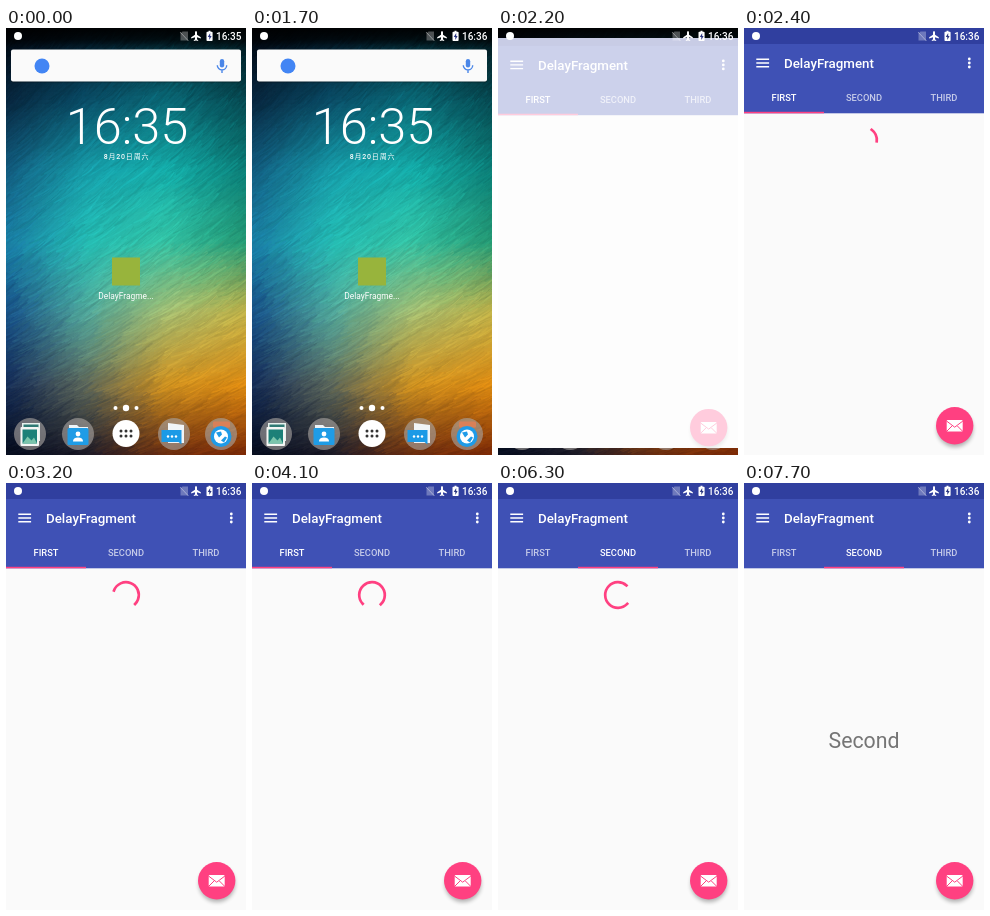
An HTML page with a canvas that plays this animation: 240x427 px, repeating every 8000 ms.

```html
<!DOCTYPE html>
<html lang="en">
<head>
<meta charset="utf-8">
<title>Delayed tab loading</title>
<style>
  html, body { margin: 0; width: 100%; height: 100%; overflow: hidden; background: #000; }
  canvas, svg { position: absolute; left: 0; top: 0; width: 100%; height: 100%; display: block; }
  text { font-family: Roboto, "Noto Sans", sans-serif; fill: #fff; text-anchor: middle; }
  .cjk { font-family: Roboto, "Noto Sans CJK SC", "Noto Sans CJK", sans-serif; }
  .tab { font-size: 9.33px; font-weight: 500; }
</style>
</head>
<body>
<canvas id="wall" width="240" height="427"></canvas>
<svg viewBox="0 0 240 427" preserveAspectRatio="none">
  <defs>
    <linearGradient id="scrim" x2="0" y2="1">
      <stop offset="0" stop-opacity=".9"/><stop offset=".6" stop-opacity=".6"/><stop offset="1" stop-opacity="0"/>
    </linearGradient>
    <filter id="soft" x="-50%" y="-50%" width="200%" height="200%"><feGaussianBlur stdDeviation="2"/></filter>
    <clipPath id="reveal"><rect id="revealBox"/></clipPath>
  </defs>

  <g id="home">
    <rect width="240" height="20" fill="url(#scrim)"/>
    <rect x="5" y="22.5" width="230" height="32" rx="2" opacity=".35"/>
    <rect x="5" y="21.5" width="230" height="32" rx="2" fill="#fafafa"/>
    <circle cx="36" cy="38" r="7.5" fill="#4285f4"/>
    <g fill="none" stroke="#4a86e8" stroke-width="1.4">
      <rect x="213.8" y="31" width="4.4" height="8.4" rx="2.2" fill="#4a86e8" stroke="none"/>
      <path d="M211.3 37.2a4.7 4.7 0 0 0 9.4 0M216 42v3"/>
    </g>
    <text x="121" y="116" font-size="50.5" font-weight="300">16:35</text>
    <text class="cjk" x="120.5" y="131" font-size="7" font-weight="500" letter-spacing=".8">8月20日周六</text>
    <rect x="106" y="229.5" width="28" height="28" fill="#98b43c"/>
    <text x="120" y="271" font-size="8.4">DelayFragme...</text>
    <g fill="#fff">
      <circle cx="109.5" cy="380" r="2"/><circle cx="120" cy="380" r="3.2"/><circle cx="130.5" cy="380" r="2"/>
    </g>
    <g fill="#a9a4a2" fill-opacity=".62">
      <circle cx="24" cy="406" r="16"/><circle cx="72" cy="406" r="16"/>
      <circle cx="168" cy="406" r="16"/><circle cx="215" cy="406" r="16"/>
    </g>
    <g>
      <rect x="16" y="395" width="18" height="18" fill="#e8f2ee"/>
      <rect x="17.5" y="396.500" width="15" height="4" fill="#2f7a74"/>
      <rect x="14.5" y="399" width="18.5" height="19" rx="1" fill="#f4f6f4"/>
      <rect x="16.5" y="401.500" width="14.5" height="14" fill="#1c8078"/>
      <path d="M16.500 415.500l5-7 4 4 2.500-3 3 6z" fill="#7bc5ac"/>
    </g>
    <g>
      <path d="M63 397h8l2 2h9v6H63z" fill="#eef4f8"/>
      <rect x="61.5" y="400" width="21" height="17" rx="1.5" fill="#1f9ce6"/>
      <circle cx="72" cy="406" r="2.4" fill="#fff"/>
      <path d="M67 413.5q0-4 5-4t5 4z" fill="#fff"/>
    </g>
    <circle cx="120" cy="405.5" r="13.5" fill="#fff"/>
    <g id="drawerDots" fill="#333"></g>
    <g>
      <path d="M162 395l16 2v18h-16z" fill="#f1f5f8"/>
      <path d="M155.500 402h20v14.500l-3-2.500h-17z" fill="#1c9ae6"/>
      <g fill="#fff"><circle cx="162" cy="408.5" r="1.2"/><circle cx="166" cy="408.5" r="1.2"/><circle cx="170" cy="408.5" r="1.2"/></g>
    </g>
    <g>
      <rect x="207" y="393.500" width="17" height="6" rx="1" fill="#d98058"/>
      <circle cx="215" cy="408.500" r="10.5" fill="#1e9be8"/>
      <circle cx="215" cy="408.500" r="7" fill="#fff"/>
      <path d="M210 404.500l5-1 1 3-3 3zM215 412.500l4-4 2 1-3 5z" fill="#1e9be8"/>
    </g>
  </g>

  <g clip-path="url(#reveal)">
    <g id="app">
      <rect y="-1" width="240" height="480" fill="#fafafa"/>
      <g id="pages"></g>
      <rect width="240" height="85.3" fill="#3f51b5"/>
      <rect y="-20" width="240" height="36" fill="#303f9f"/>
      <path d="M12.3 31.3h12.8M12.3 35h12.8M12.3 38.7h12.8" stroke="#fff" stroke-width="1.4"/>
      <text x="40" y="39.8" font-size="13.33" font-weight="500" style="text-anchor:start">DelayFragment</text>
      <g fill="#fff">
        <circle cx="225.3" cy="31" r="1.4"/><circle cx="225.3" cy="35" r="1.4"/><circle cx="225.3" cy="39" r="1.4"/>
      </g>
      <text class="tab" x="40" y="73">FIRST</text>
      <text class="tab" x="120" y="73">SECOND</text>
      <text class="tab" x="200" y="73">THIRD</text>
      <rect id="marker" y="83.8" width="80" height="1.5" fill="#ff4081"/>
      <circle cx="211" cy="401" r="18" opacity=".3" filter="url(#soft)"/>
      <circle cx="210.7" cy="397.7" r="18.7" fill="#ff4081"/>
      <rect x="202.7" y="392" width="16" height="11.5" rx="1" fill="#fff"/>
      <path d="M202.5 393l8.2 6.2 8.2-6.2M203 403l5-5M218.4 403l-5-5" fill="none" stroke="#ff4081" stroke-width="1"/>
      <rect id="veil" y="-20" width="240" height="500" fill="#fff"/>
    </g>
  </g>

  <g id="status">
    <circle cx="12" cy="8" r="4" fill="#fff"/>
    <path d="M176.500 3.500h5.500v9h-7.500v-7z" fill="#fff" opacity=".3"/>
    <path d="M174 4l8.500 9" stroke="#fff" stroke-opacity=".4"/>
    <path d="M190 3q1 0 1 1.500v2.300l3.800 2.400v1.200l-3.800-1.200v2l1.200 1v.8l-2.200-.6-2.200.6v-.8l1.200-1v-2l-3.800 1.200V9.200l3.800-2.400V4.500Q189 3 190 3z" fill="#fff"/>
    <path d="M201.300 3.800h1.200v-1h2v1h1.300q.8 0 .8.800v7.600q0 .8-.8.800h-4.500q-.8 0-.8-.8V4.600q0-.8.8-.8z" fill="#fff"/>
    <path d="M204.200 5l-2.400 4h1.500v3l2.300-4h-1.400z" fill="#2a3580"/>
    <text id="clock" x="222.700" y="11.700" font-size="10" font-weight="500"></text>
  </g>
</svg>
<script>
const LOOP = 8000, TICK = 1200;
const OPEN = 2050, OPEN_LEN = 233;
const SWIPE = 5130, SWIPE_LEN = 300;
const SPIN_START = 2315, SPIN_BEND = 4100, CYCLE = 1333;

const $ = id => document.getElementById(id);
const clamp = v => Math.min(1, Math.max(0, v));
const mix = (a, b, k) => a + (b - a) * k;
const setAttrs = (el, attrs) => { for (const k in attrs) el.setAttribute(k, attrs[k]); };

function add(parent, tag, attrs) {
  const el = document.createElementNS("http://www.w3.org/2000/svg", tag);
  setAttrs(el, attrs);
  return parent.appendChild(el);
}

function seeded(seed) {
  return () => (seed = (seed * 16807) % 2147483647) / 2147483647;
}

// Brushed wallpaper: short strokes coloured from a coarse colour field.
function paintWall() {
  const field = [
    "02060d 03101c 041822 031219",
    "08263e 0a4c66 0b6a78 074850",
    "135c80 18a0ac 16b0ac 0c7f78",
    "1a7fa6 25bdb4 35c2a4 259a74",
    "174f86 52a89c a4bb70 c4b348",
    "142c58 5f6a5c cf9220 dc8a12",
    "060c1c 1c1a28 6a2c10 7a2806"
  ].map(row => row.split(" ").map(hex => [0, 2, 4].map(i => parseInt(hex.slice(i, i + 2), 16))));
  const colourAt = (x, y, gain) => {
    const u = clamp(x / 240) * 2.999, v = clamp(y / 427) * (field.length - 1.001);
    const c = Math.floor(u), r = Math.floor(v);
    const rgb = [0, 1, 2].map(i => Math.round(gain * mix(
      mix(field[r][c][i], field[r][c + 1][i], u - c),
      mix(field[r + 1][c][i], field[r + 1][c + 1][i], u - c), v - r)));
    return `rgb(${rgb})`;
  };
  const g = $("wall").getContext("2d"), rnd = seeded(41);
  for (let y = 0; y < 427; y += 4)
    for (let x = 0; x < 240; x += 4) {
      g.fillStyle = colourAt(x + 2, y + 2, 1);
      g.fillRect(x, y, 4, 4);
    }
  g.lineCap = "round";
  g.globalAlpha = .5;
  for (let i = 0; i < 6000; i++) {
    const x = rnd() * 260 - 10, y = rnd() * 447 - 10;
    const angle = mix(.85, .4, clamp(y / 427)) + (rnd() - .5) * .3;
    const len = 6 + rnd() * 14, dx = Math.cos(angle) * len, dy = -Math.sin(angle) * len;
    g.strokeStyle = colourAt(x, y, .88 + rnd() * .24);
    g.lineWidth = .6 + rnd() * 1.4;
    g.beginPath();
    g.moveTo(x - dx, y - dy);
    g.quadraticCurveTo(x + 2, y + 2, x + dx, y + dy);
    g.stroke();
  }
}

function makePage(label) {
  const root = add($("pages"), "g", {});
  const ring = add(root, "circle", {
    cx: 120, cy: 112, r: 12.8, pathLength: 360, fill: "none",
    stroke: "#ff4081", "stroke-width": 2.7, "stroke-linecap": "square"
  });
  const text = add(root, "text", { x: 120, y: 265, "font-size": 21.3, style: "fill:#757575" });
  text.textContent = label;
  return { root, ring, text };
}

// cubic-bezier(.4, 0, .2, 1)
function ease(x) {
  x = clamp(x);
  let lo = 0, hi = 1;
  for (let i = 0; i < 20; i++) {
    const s = (lo + hi) / 2, r = 1 - s;
    if (1.2 * r * r * s + .6 * r * s * s + s * s * s < x) lo = s; else hi = s;
  }
  return 3 * (1 - lo) * lo * lo + lo ** 3;
}

function spinnerArc(t) {
  const time = Math.max(0, Math.min(t, SPIN_BEND) - SPIN_START) * 1.87 + Math.max(0, t - SPIN_BEND) * 1.777;
  const x = time / CYCLE % 1;
  const tail = 270 * ease(x * 2 - 1), head = 270 * ease(x * 2);
  return { start: time * 720 / 4444 + 90 * x + tail, sweep: Math.max(.5, head - tail) };
}

paintWall();
for (let i = 0; i < 6; i++)
  add($("drawerDots"), "circle", { cx: 115 + i % 3 * 5, cy: 403 + Math.floor(i / 3) * 5, r: 1.5 });
const pages = [makePage("First"), makePage("Second")];
const loadedAt = [4300, 7700];
const tabs = [...document.querySelectorAll(".tab")];

function drawOpening(t) {
  const p = clamp((t - OPEN) / OPEN_LEN), rest = (1 - p) ** 3;
  const side = Math.max(0, rest - .05);
  const top = Math.round(237 * rest), bottom = Math.round(427 - 160 * rest);
  setAttrs($("revealBox"), { x: 106 * side, y: top, width: 240 - 211 * side, height: bottom - top });
  setAttrs($("app"), {
    transform: `translate(0 ${44 * rest})`,
    opacity: clamp(p * 2.5),
    visibility: t < OPEN ? "hidden" : "visible"
  });
  $("veil").setAttribute("opacity", clamp((2300 - t) / 135));
}

function drawPages(t) {
  const turn = 1 - (1 - clamp((t - SWIPE) / SWIPE_LEN)) ** 5;
  const arc = spinnerArc(t);
  pages.forEach(({ root, ring, text }, i) => {
    const loaded = t >= loadedAt[i];
    root.setAttribute("transform", `translate(${240 * (i - turn)} 0)`);
    setAttrs(ring, {
      transform: `rotate(${arc.start - 90} 120 112)`,
      "stroke-dasharray": `${arc.sweep} 360`,
      opacity: loaded || t < SPIN_START ? 0 : 1
    });
    text.setAttribute("opacity", loaded ? 1 : 0);
  });
  $("marker").setAttribute("x", 80 * turn);
  const active = t < SWIPE ? 0 : 1;
  tabs.forEach((tab, i) => tab.setAttribute("opacity", i === active ? 1 : .7));
}

function draw(t) {
  $("clock").textContent = t < TICK ? "16:35" : "16:36";
  drawOpening(t);
  drawPages(t);
}

const begin = performance.now();
function loop() {
  draw((performance.now() - begin) % LOOP);
  requestAnimationFrame(loop);
}
draw(0);
requestAnimationFrame(loop);
</script>
</body>
</html>
```
